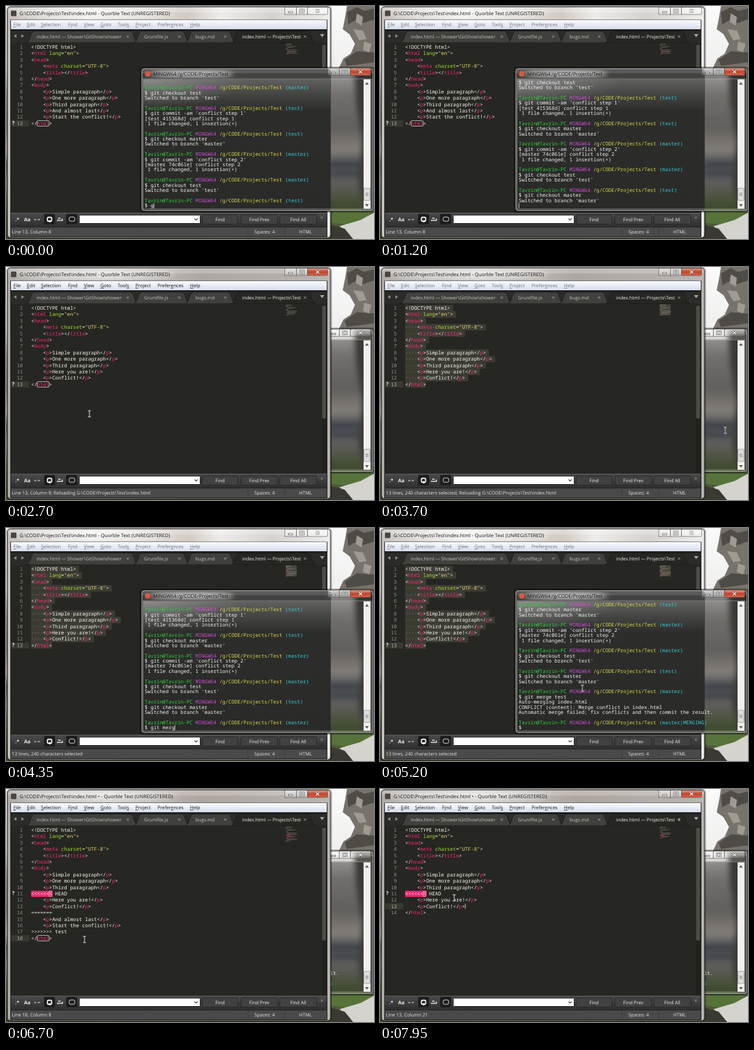
An HTML page for the animation above (8000 ms loop, 600 by 381 pixels).

```html
<!DOCTYPE html>
<html lang="en">
<head>
<meta charset="utf-8">
<title>Merge conflict demo</title>
<style>
html, body { margin: 0; width: 100%; height: 100%; overflow: hidden; background: #d4d1cd; }
svg { display: block; width: 100vw; height: 100vh; }
text { white-space: pre; text-rendering: geometricPrecision; }
.mono { font: 8.13px "Noto Sans Mono", "DejaVu Sans Mono", monospace; }
.ui { font: 7.7px "Open Sans", "Noto Sans", sans-serif; }
.title { font: 8.03px "Open Sans", "Noto Sans", sans-serif; }
.bold { font: bold 8px "Open Sans", "Noto Sans", sans-serif; }
.mid { text-anchor: middle; }
.end { text-anchor: end; }
</style>
</head>
<body>
<svg viewBox="0 0 600 381" preserveAspectRatio="none">
  <defs>
    <filter id="soft" x="-20%" y="-20%" width="140%" height="140%"><feGaussianBlur stdDeviation="4"/></filter>
    <filter id="haze" x="-20%" y="-20%" width="140%" height="140%"><feGaussianBlur stdDeviation=".7"/></filter>
    <linearGradient id="wall" x2="0" y2="1">
      <stop offset="0" stop-color="#fafafa"/><stop offset=".27" stop-color="#f0efee"/>
      <stop offset=".38" stop-color="#a8a4a0"/><stop offset=".52" stop-color="#8f8b88"/>
      <stop offset=".62" stop-color="#c0b9b0"/><stop offset=".68" stop-color="#676d76"/>
      <stop offset=".76" stop-color="#8d8b88"/><stop offset=".84" stop-color="#66744e"/>
      <stop offset="1" stop-color="#3f4a2c"/>
    </linearGradient>
    <linearGradient id="frameOff">
      <stop offset="0" stop-color="#c6c0bb"/><stop offset=".25" stop-color="#eeedeb"/>
      <stop offset=".56" stop-color="#d3cbc4"/><stop offset=".66" stop-color="#eeecea"/>
      <stop offset=".82" stop-color="#d6d2cf"/><stop offset="1" stop-color="#efeeed"/>
    </linearGradient>
    <linearGradient id="frameOn">
      <stop offset="0" stop-color="#b0aba7"/><stop offset=".3" stop-color="#cfccc9"/>
      <stop offset=".6" stop-color="#aea6a0"/><stop offset="1" stop-color="#b9b5b1"/>
    </linearGradient>
    <linearGradient id="menu" x2="0" y2="1"><stop offset="0" stop-color="#f8fafd"/><stop offset="1" stop-color="#d6deec"/></linearGradient>
    <linearGradient id="panel" x2="0" y2="1"><stop offset="0" stop-color="#4b4b4b"/><stop offset="1" stop-color="#2f2f2f"/></linearGradient>
    <linearGradient id="red" x2="0" y2="1"><stop offset="0" stop-color="#e2a08f"/><stop offset=".5" stop-color="#c4422c"/><stop offset="1" stop-color="#d4674d"/></linearGradient>
    <linearGradient id="glass" x2="0" y2="1"><stop offset="0" stop-color="#fff" stop-opacity=".5"/><stop offset="1" stop-color="#fff" stop-opacity=".12"/></linearGradient>
    <linearGradient id="sheet" x2="0" y2="1"><stop offset="0" stop-color="#626261"/><stop offset=".1" stop-color="#484847"/><stop offset=".24" stop-color="#2d2d2c"/><stop offset="1" stop-color="#2a2a29"/></linearGradient>
    <radialGradient id="shine" cx="0" cy="0" r="1"><stop offset="0" stop-color="#fff" stop-opacity=".28"/><stop offset="1" stop-color="#fff" stop-opacity="0"/></radialGradient>
    <clipPath id="pane"><rect x="528" y="101" width="72" height="235"/></clipPath>
    <g id="photo">
      <rect width="600" height="381" fill="url(#wall)"/>
      <path d="M556 0H600V101H543L550 86 562 78 569 62 560 46 549 38 553 18Z" fill="#77726a"/>
      <path d="M556 10l16-8 12 6 16-4v18l-18 6-14-4-10 6z M552 88l20-14 28 2v16l-44 6z" fill="#4f4b45"/>
      <path d="M572 12l10 6-2 14-10-6z M566 38l16 2 6 14-12 2z M584 58l12 4-4 14-10-4z" fill="#a09b92"/>
      <path d="M566 101H600V336H584L574 290 580 220 570 160Z" fill="#59554f"/>
      <path d="M530 254h44v7h-44z M530 272h46v6h-46z" fill="#525a68"/>
      <path d="M530 336h66l-8 16-28 6-30-4z" fill="#57733a"/>
      <path d="M544 360l34-10 22-12v43h-36z" fill="#d5d3ce"/>
      <path d="M530 358l22 6 14 17h-36z" fill="#3b3a32"/>
    </g>
  </defs>
  <use href="#photo" filter="url(#haze)"/>
  <g id="scene"></g>
</svg>
<script>
const CHAR = 4.88, ROW = 10.4, TERM_ROW = 8.39, LOOP = 8000;
const EDIT_X = 41, TERM_X = 226;
const USER = 'Tavrin@Tavrin-PC';
const PATH = 'G:\\CODE\\Projects\\Test\\index.html';

const esc = s => s.replace(/&/g, '&amp;').replace(/</g, '&lt;');
const rect = (x, y, w, h, fill, more = '') => `<rect x="${x}" y="${y}" width="${w}" height="${h}" fill="${fill}" ${more}/>`;
const span = (s, fill) => `<tspan fill="${fill}">${esc(s)}</tspan>`;
const rich = (x, y, body, cls, fill = '#f8f8f2') => `<text x="${x}" y="${y}" class="${cls}" fill="${fill}">${body}</text>`;
const label = (x, y, s, fill, cls = 'ui') => rich(x, y, esc(s), cls, fill);
const line = (d, stroke, width = 1) => `<path d="${d}" fill="none" stroke="${stroke}" stroke-width="${width}"/>`;
const cross = (x, y, r, stroke, w) => line(`M${x - r} ${y - r}l${2 * r} ${2 * r}m0 ${-2 * r}l${-2 * r} ${2 * r}`, stroke, w);

// Documents
const paragraph = s => `    <p>${s}</p>`;
const doc = (...tail) => ['<!DOCTYPE html>', '<html lang="en">', '<head>', '    <meta charset="UTF-8">',
  '    <title></title>', '</head>', '<body>',
  ...['Simple paragraph', 'One more paragraph', 'Third paragraph'].map(paragraph), ...tail, '</html>'];
const theirs = ['And almost last', 'Start the conflict!'].map(paragraph);
const ours = ['Here you are!', 'Conflict!'].map(paragraph);
const docs = {
  test: doc(...theirs),
  master: doc(...ours),
  conflict: doc('<<<<<<< HEAD', ...ours, '=======', ...theirs, '>>>>>>> test'),
  edited: doc('<<<<<<< HEAD', ...ours)
};

// Terminal log; '~branch' stands for a prompt line
const checkout = (from, to) => ['~' + from, '$ git checkout ' + to, `Switched to branch '${to}'`, ''];
const commit = (branch, hash, n) => ['~' + branch, `$ git commit -am 'conflict step ${n}'`,
  `[${branch} ${hash}] conflict step ${n}`, ' 1 file changed, 1 insertion(+)', ''];
const log = ['', ...checkout('master', 'test'), ...commit('test', '415368d', 1), ...checkout('test', 'master'),
  ...commit('master', '74c061e', 2), ...checkout('master', 'test'), ...checkout('test', 'master'),
  '~master', '$ git merge test', 'Auto-merging index.html',
  'CONFLICT (content): Merge conflict in index.html',
  'Automatic merge failed; fix conflicts and then commit the result.', '', '~master|MERGING'];

// Each step changes only the listed parts of the state
const start = { front: 'term', menuOn: false, doc: 'test', sel: null, row: 13, mark: 13, dirty: false, tabDot: false,
  status: 'Line 13, Column 8', lines: 24, typed: '$ g', caret: true, mouse: null };
const command = 'git checkout master';
const picked = '13 lines, 240 characters selected';
const steps = [
  [0, {}],
  ...Array.from({ length: 11 }, (_, i) => [100 + i * 100, { typed: '$ ' + command.slice(0, Math.round(1 + 18 * (i + 1) / 11)) }]),
  [1200, { lines: 26, typed: '' }],
  [1450, { lines: 28, typed: '$ ' }],
  [1700, { caret: false, mouse: [262, 236] }],
  [1950, { caret: true, mouse: [172, 241] }],
  [2200, { caret: false, mouse: [136, 240] }],
  [2450, { front: 'edit', menuOn: true }],
  [2700, { doc: 'master', status: 'Line 13, Column 8; Reloading ' + PATH }],
  [2950, { sel: [1, 13], status: picked + '; Reloading ' + PATH }],
  [3200, { mouse: [290, 252] }],
  [3450, { mouse: [500, 264] }],
  [3700, { mouse: [563, 267], menuOn: false }],
  [3950, { front: 'term', mouse: null, caret: true }],
  [4050, { typed: '$ g' }],
  [4150, { typed: '$ git' }],
  [4250, { typed: '$ git m', status: picked }],
  [4350, { typed: '$ git merg' }],
  [4450, { typed: '$ git merge ' }],
  [4550, { typed: '$ git merge te' }],
  [4650, { typed: '$ git merge test' }],
  [4750, { lines: 29, typed: '' }],
  [4850, { lines: 32 }],
  [4950, { lines: 34, typed: '$ ' }],
  [5200, { caret: false, mouse: [330, 262] }],
  [5450, { caret: true, mouse: [190, 275] }],
  [5700, { front: 'edit', menuOn: true, dirty: true, mouse: [133, 280], caret: false }],
  [5950, { doc: 'conflict', sel: null, row: 18, mark: 11, status: 'Line 18, Column 8' }],
  [6200, { mouse: [135, 262] }],
  [6450, { mouse: [128, 246] }],
  [6950, { mouse: [110, 236], row: 17, status: 'Line 17, Column 13' }],
  [7200, { mouse: [120, 218], sel: [14, 17], row: 14, status: '4 lines, 84 characters selected' }],
  [7450, { mouse: [142, 206] }],
  [7700, { doc: 'edited', sel: null, row: 13, tabDot: true, status: 'Line 13, Column 21' }],
  [7950, { mouse: [121, 178] }]
];
let last = start;
const states = steps.map(([time, change]) => ({ time, state: last = { ...last, ...change } }));

function highlight(code, dots) {
  let prev = '';
  return code.split(/("[^"]*"|\b\w+(?==)|(?<=<\/?)\w+)/).map((part, i) => {
    const color = i % 2 === 0 ? '#f8f8f2' : /[<\/]$/.test(prev) ? '#f92672' : part[0] === '"' ? '#e6db74' : '#a6e22e';
    prev = part;
    if (!dots) return span(part, color);
    return part.split(/( +)/).map(s => s[0] === ' ' ? span('·'.repeat(s.length), '#8a8674') : span(s, color)).join('');
  }).join('');
}

function code(s) {
  return docs[s.doc].map((src, i) => {
    const n = i + 1, y = 70 + i * ROW, top = y - 8;
    const selected = s.sel && n >= s.sel[0] && n <= s.sel[1];
    const tail = n === docs[s.doc].length ? 0 : 1;
    let out = '';
    if (n === s.row) out += rect(8, top, 30, ROW, '#383831');
    if (selected) out += rect(EDIT_X, top, (src.length + tail) * CHAR, ROW + .2, '#3d3c34');
    out += rich(27.5, y, n, 'mono end', n === s.row ? '#b5b5a8' : '#8f908a');
    if (n === s.mark) out += label(10, y - 1, '?', '#fff', 'bold');
    if (src.startsWith('<<<')) out += rect(EDIT_X, top + .5, 7 * CHAR, ROW - .5, '#f92672')
      + line(`M${EDIT_X + 6 * CHAR} ${top + 1}h${CHAR}v${ROW - 2}h${-CHAR}z`, '#ffd0dd', .7);
    out += rich(EDIT_X, y, highlight(src, selected), 'mono');
    if (n === s.row && !s.sel) out += src === '</html>'
      ? rect(EDIT_X + 2 * CHAR, top + .7, 4 * CHAR, 9, 'none', 'rx="1.5" stroke="#d8d8d0" stroke-width=".8"')
      : line(`M${EDIT_X + src.length * CHAR + .5} ${top + 1}v8.5`, '#f8f8f0', .8);
    return out;
  }).join('');
}

function minimap(s) {
  const box = s.sel ? rect(456, 61 + s.sel[0] * 1.4 - 1.4, 18, (s.sel[1] - s.sel[0] + 1) * 1.4, '#45443b') : '';
  return box + docs[s.doc].map((src, i) => {
    const indent = src.search(/\S/) * .65, y = 61.5 + i * 1.4;
    const pink = src.startsWith('<<<');
    return rect(456 + indent, y, src.trim().length * .65, .8, pink ? '#f92672' : '#a39a92', pink ? '' : 'opacity=".45"')
      + (src.includes('<p') ? rect(456 + indent, y, 2, .8, '#96395a') : '');
  }).join('');
}

function buttons(x, y, active, ink) {
  const edge = 'stroke="#4c4a48" stroke-width=".6"';
  return rect(x, y, 19, 12, 'url(#glass)', edge) + rect(x + 19, y, 18, 12, 'url(#glass)', edge)
    + rect(x + 37, y, 33, 12, active ? 'url(#red)' : 'url(#glass)', edge + ' rx="2"')
    + rect(x + 6, y + 7, 7, 2.2, '#fff', `stroke="${ink}" stroke-width=".7"`)
    + rect(x + 25, y + 3.6, 6, 5, 'none', `stroke="${ink}" stroke-width="2.2"`)
    + rect(x + 25, y + 3.6, 6, 5, 'none', 'stroke="#fff" stroke-width="1"')
    + cross(x + 53.5, y + 6, 2.6, active ? '#6b2a20' : ink, 2.6) + cross(x + 53.5, y + 6, 2.6, '#fff', 1.4);
}

function tab(x, end, textX, name, active, dot) {
  const fill = active ? '#262622' : '#40413d', ink = active ? '#f2f2ee' : '#c4c4be';
  return `<path d="M${x} 60C${x + 8} 59 ${x + 6} 41 ${x + 14} 41H${end - 14}C${end - 6} 41 ${end - 8} 59 ${end} 60Z" fill="${fill}" stroke="#161713" stroke-width=".8"/>`
    + label(textX, 53, name, ink)
    + (dot ? `<circle cx="487.5" cy="50" r="2.3" fill="#8c8c88"/>` : cross(end - 17.5, 50, 1.8, '#a2a29d', 1));
}

const menus = [['File', 12, 0], ['Edit', 34, 0], ['Selection', 57, 0], ['Find', 101, 1], ['View', 127, 0], ['Goto', 154, 0],
  ['Tools', 182, 4], ['Project', 211, 0], ['Preferences', 247, 6], ['Help', 300, 0]];

function menuBar(on) {
  return menus.map(([name, x, key]) => rich(x, 33, esc(name.slice(0, key))
    + `<tspan text-decoration="underline">${name[key]}</tspan>` + name.slice(key + 1), 'ui', on ? '#111' : '#66707f')).join('');
}

function findPanel() {
  const button = (x, w, s) => rect(x, 341.5, w, 15, '#414141', 'rx="2" stroke="#222" stroke-width=".8"')
    + label(x + w / 2, 352, s, '#eee', 'ui mid');
  return rect(8, 338, 515, 23, 'url(#panel)') + line('M8 338.5H523', '#5d5d5d')
    + rect(62, 340, 18, 17, '#1d1d1d', 'rx="2"') + rect(98, 340, 18, 17, '#1d1d1d', 'rx="2"')
    + label(15, 352, '.*', '#eee', 'bold') + label(29.5, 352, 'Aa', '#eee', 'bold') + label(46, 354, '“ ”', '#eee', 'bold')
    + rect(67.5, 345.5, 7, 6.5, 'none', 'rx="2" stroke="#fff" stroke-width="1.8"') + line('M72 350l-2 2 2 2', '#fff', 1.2)
    + line('M83 350.5h9v-3M85 347h4', '#eee', 1.4)
    + rect(103, 345, 9, 7, 'none', 'rx="2" stroke="#ddd"')
    + rect(119.5, 342, 197, 13.5, '#fff', 'stroke="#1c1c1c" rx="1"')
    + line('M307.5 347.5l2.5 2.5 2.5-2.5', '#333', 1.2)
    + button(320, 58, 'Find') + button(383, 60, 'Find Prev') + button(446.5, 60, 'Find All')
    + cross(515, 346, 1.7, '#999', .9);
}

function editor(s) {
  const active = s.front === 'edit';
  const title = `${PATH}${s.dirty ? ' •' : ''} - Quorble Text (UNREGISTERED)`;
  return rect(.5, 0, 531, 381, '#000', 'opacity=".28" rx="6"')
    + rect(2.5, 1.5, 526.5, 377.5, `url(#${active ? 'frameOn' : 'frameOff'})`, 'rx="5" stroke="#2b2a29"')
    + rect(3.5, 2.5, 524.5, 8, '#fff', 'opacity=".22" rx="4"')
    + `<ellipse cx="146" cy="12" rx="130" ry="6" fill="#fff" opacity=".6" filter="url(#soft)"/>`
    + rect(8, 7.5, 9, 9, '#4b4641', 'rx="1"') + label(22, 15, title, '#111', 'title')
    + buttons(454.5, 2, active, active ? '#444' : '#555')
    + rect(7, 22.5, 517, 355.5, '#1c1c1a') + rect(8, 23, 515, 15, 'url(#menu)') + menuBar(s.menuOn)
    + rect(8, 38, 515, 22, '#2b2b28') + rect(8, 38, 515, 3, '#20211d')
    + '<path d="M17 46v6l-4.500-3zM25 46v6l4.500-3z" fill="#8d8d88"/><path d="M512 46h7l-3.500 5z" fill="#aaa"/>'
    + tab(33, 216, 50, 'index.html — Shower\\GitShow\\shower') + tab(208, 300, 225, 'Gruntfile.js')
    + tab(292, 375, 309, 'bugs.md') + tab(367, 505, 385, 'index.html — Projects\\Test', true, s.tabDot)
    + rect(8, 60, 515, 278, '#262622')
    + code(s) + minimap(s)
    + rect(515.5, 62, 6, 275, '#20211c') + rect(515.5, 63, 6, 185, '#4d4e49', 'rx="3"')
    + findPanel()
    + rect(8, 361, 515, 16, '#4a4a4a') + line('M8 361.5H523', '#222')
    + line('M394.500 363v13M454.500 363v13', '#3a3a3a')
    + label(9.5, 371.5, s.status, '#e4e4e4') + label(405, 371.5, 'Spaces: 4', '#e4e4e4') + label(478, 371.5, 'HTML', '#e4e4e4');
}

function terminalLine(src, row) {
  const y = 127.8 + row * TERM_ROW;
  const body = src[0] === '~'
    ? span(USER, '#2fd03c') + span(' MINGW64', '#d04fd0') + span(' /g/CODE/Projects/Test', '#dcdc48') + span(` (${src.slice(1)})`, '#3acfd4')
    : esc(src);
  return rich(TERM_X, y, body, 'mono', '#f4f4f4');
}

function terminal(s) {
  const active = s.front === 'term';
  const rows = [...log.slice(0, s.lines), s.typed].slice(-25);
  const caretX = TERM_X + s.typed.length * CHAR + .5;
  return rect(218, 99, 384, 239, '#000', 'opacity=".3" rx="6"')
    + `<g clip-path="url(#pane)"><use href="#photo" filter="url(#soft)"/></g>`
    + rect(220.5, 101.5, 309, 234, '#424241', 'rx="5"')
    + rect(224, 119.5, 305, 212, 'url(#sheet)') + rect(224, 119.5, 170, 50, 'url(#shine)')
    + rect(529, 119.5, 54, 212, '#000', 'opacity=".32"')
    + (active ? rect(529, 102, 70, 17, '#000', 'opacity=".4"') : '')
    + `<ellipse cx="303" cy="111" rx="68" ry="5" fill="#fff" opacity=".8" filter="url(#soft)"/>`
    + rect(221, 102, 378, 8, '#fff', 'opacity=".13"')
    + rect(220.5, 101.5, 379, 234, 'none', 'rx="5" stroke="#191918"')
    + rect(221.5, 102.5, 377, 232, 'none', 'rx="4" stroke="#e8e8e6" stroke-opacity=".75" stroke-width=".9"')
    + rect(223.5, 119, 371, 213, 'none', 'stroke="#8b8b88" stroke-width=".8"')
    + '<circle cx="231" cy="111" r="4.500" fill="#d95b43"/>'
    + label(240, 114, 'MINGW64:/g/CODE/Projects/Test', '#111', 'title')
    + buttons(524.5, 101.5, active, '#444')
    + rows.map(terminalLine).join('')
    + (s.caret ? line(`M${caretX} ${120.8 + 24 * TERM_ROW}v8.500`, '#e8e8e8', .9) : '')
    + rect(583, 120, 11, 211.5, '#f0f0ef') + rect(583.5, 298, 10, 20, '#dedede', 'rx="1" stroke="#8d8d8d" stroke-width=".8"')
    + line('M586 306h5m-5 2h5m-5 2h5', '#777', .8)
    + '<path d="M585.500 128.500h6l-3-4zM585.500 324h6l-3 4z" fill="#555"/>';
}

function pointer([x, y]) {
  const d = `M${x - 2.5} ${y - 5}h5m-2.500 0v10m-2.500 0h5`;
  return line(d, '#222', 2) + line(d, '#eee', 1);
}

function draw(s) {
  const order = s.front === 'term' ? [editor, terminal] : [terminal, editor];
  return order.map(paint => paint(s)).join('') + (s.mouse ? pointer(s.mouse) : '');
}

const scene = document.getElementById('scene');
const began = performance.now();
let shown = null;
function tick() {
  const t = (performance.now() - began) % LOOP;
  const current = states.findLast(step => step.time <= t).state;
  if (current !== shown) scene.innerHTML = draw(shown = current);
  requestAnimationFrame(tick);
}
tick();
</script>
</body>
</html>
```
